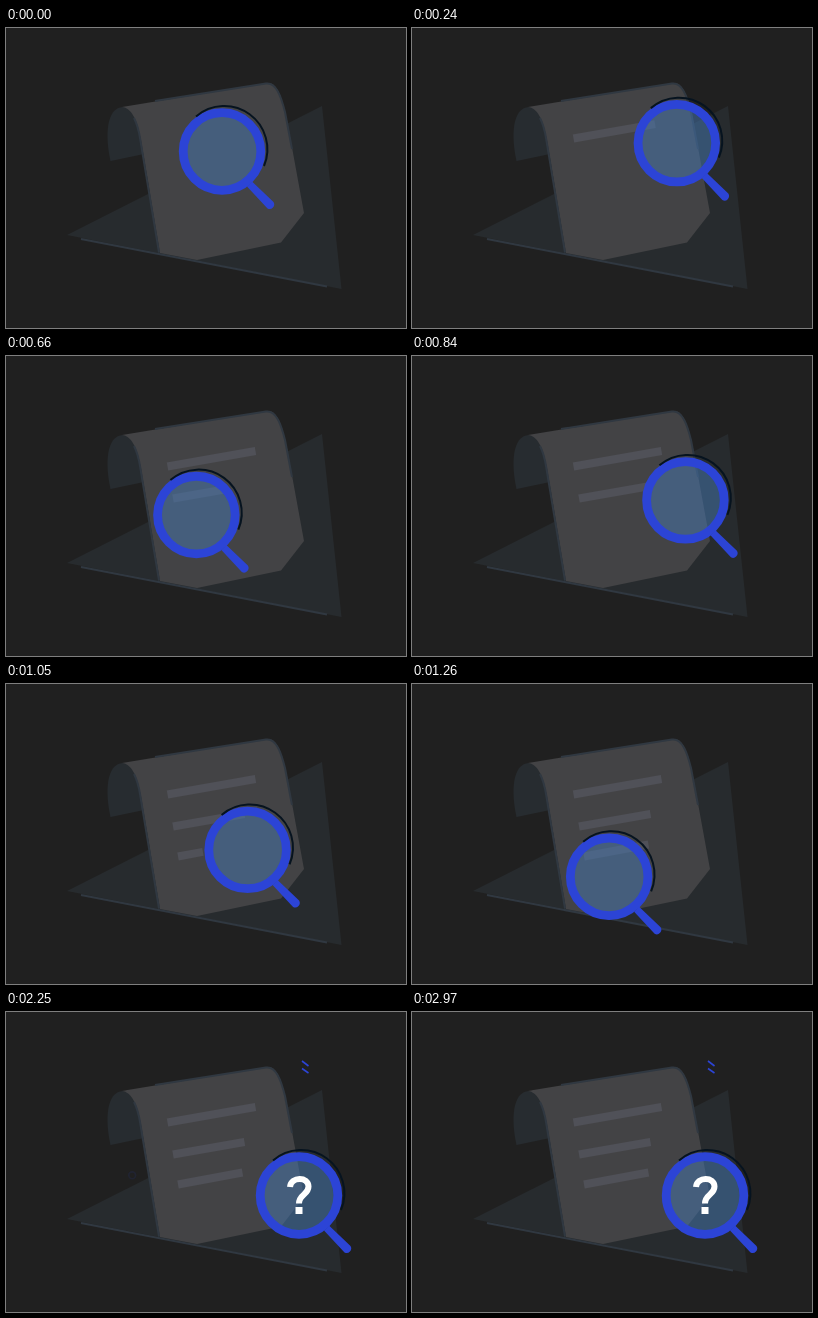
An HTML page that plays this animation: 400 px wide and 300 px high, repeating every 3.03 s.

```html
<!DOCTYPE html>
<html lang="en">
<head>
<meta charset="utf-8">
<title>Searching a document</title>
<style>
html, body { margin: 0; width: 100%; height: 100%; overflow: hidden; background: #202020; }
svg { display: block; width: 100vw; height: 100vh; }
</style>
</head>
<body>
<svg viewBox="0 0 400 300" fill="none">
  <path fill="#272b2e" d="M61 207 L316 78 L335.5 261Z"/>
  <path stroke="#303841" stroke-width="2" d="M75 211 L321 258.5"/>
  <path fill="#272c30" d="M104.500 133 C99 108 100 80 117 79 C131 80 135 105 138 126Z"/>
  <path fill="#434345" d="M116 79 L262 55 C271 55 276 68 281 92 L298 185 L275 214.500 L191 232 L154 225 L135 112 C131 90 125 80 116 79Z"/>
  <g stroke="#303841" stroke-width="2">
    <path d="M153 224.500 L134 110 Q132 98 128 90"/>
    <path d="M149 73 L260 55.500 C270 54 275 68 279 84 L286 121"/>
  </g>
  <g stroke="#505158" stroke-width="8">
    <path class="row" pathLength="1" d="M161.500 110.500 L249.500 95"/>
    <path class="row" pathLength="1" d="M167 142.500 L238.500 130"/>
    <path class="row" pathLength="1" d="M172 172.500 L236.500 160.500"/>
  </g>
  <g stroke="#2c44d6" stroke-width="1.6">
    <circle id="dot" cx="126.200" cy="163.300" r="3.400"/>
    <path class="dash" pathLength="1" d="M296 49 L302.500 54"/>
    <path class="dash" pathLength="1" d="M296 56.500 L302.500 61"/>
  </g>
  <g id="lens">
    <circle r="36" fill="#487cb8" fill-opacity=".48"/>
    <path fill="#2c44d6" d="M25 35 L30 30 L51.500 50.500 A4.600 4.600 0 0 1 45.500 57Z"/>
    <circle r="38.800" stroke="#2c44d6" stroke-width="8.800"/>
    <path stroke="#06131f" stroke-width="2" d="M-26 -35 A43.200 43.200 0 0 1 42 14.500"/>
  </g>
  <g id="mark">
    <path stroke="#fff" stroke-width="6" d="M284 175 C285 164.300 302.500 164.300 302.500 174.500 C302.500 183 293 182 293 191.500"/>
    <path id="point" fill="#fff" d="M289.500 195 h7 v7 h-7Z"/>
  </g>
</svg>
<script>
const LOOP = 3030;
// lens stops: time, x, y
const stops = [
  [0, 216, 123.5], [370, 283, 112], [620, 185, 160],
  [890, 281, 143], [1230, 195, 193], [1560, 293, 183.5]
];
const $ = id => document.getElementById(id);
const rows = document.querySelectorAll('.row');
const dashes = document.querySelectorAll('.dash');
const ramp = (t, a, b) => Math.min(1, Math.max(0, (t - a) / (b - a)));
const ease = u => (1 - Math.cos(Math.PI * u)) / 2;
const easeOut = u => 1 - (1 - u) ** 3;

function reveal(path, u) {
  path.style.visibility = u > 0 ? 'visible' : 'hidden';
  path.setAttribute('stroke-dasharray', u < 1 ? `${u} 2` : 'none');
}

function lensAt(t) {
  const i = Math.max(1, stops.findIndex(s => s[0] > t));
  if (t >= stops.at(-1)[0]) return stops.at(-1).slice(1);
  const [a, b] = [stops[i - 1], stops[i]];
  const u = ease(ramp(t, a[0], b[0]));
  return [1, 2].map(k => a[k] + (b[k] - a[k]) * u);
}

function draw(t) {
  $('lens').setAttribute('transform', `translate(${lensAt(t)})`);
  rows.forEach((row, i) => reveal(row, ramp(t, 25 + i * 468, 258 + i * 468)));
  dashes.forEach((dash, i) => reveal(dash, ramp(t, 1470 + i * 200, 1600 + i * 200)));
  $('dot').setAttribute('opacity', .75 * ramp(t, 1350, 1500) * (1 - easeOut(ramp(t, 1620, 2900))));

  const u = easeOut(ramp(t, 1540, 1960));
  $('mark').setAttribute('opacity', ramp(t, 1540, 1720));
  $('mark').setAttribute('transform',
    `translate(293 178) rotate(${22 * (1 - u)}) scale(${.8 + .2 * u}) translate(-293 -178)`);
  $('point').setAttribute('opacity', ramp(t, 1640, 1740));
}

const start = performance.now();
function tick() {
  draw((performance.now() - start) % LOOP);
  requestAnimationFrame(tick);
}
tick();
</script>
</body>
</html>
```
